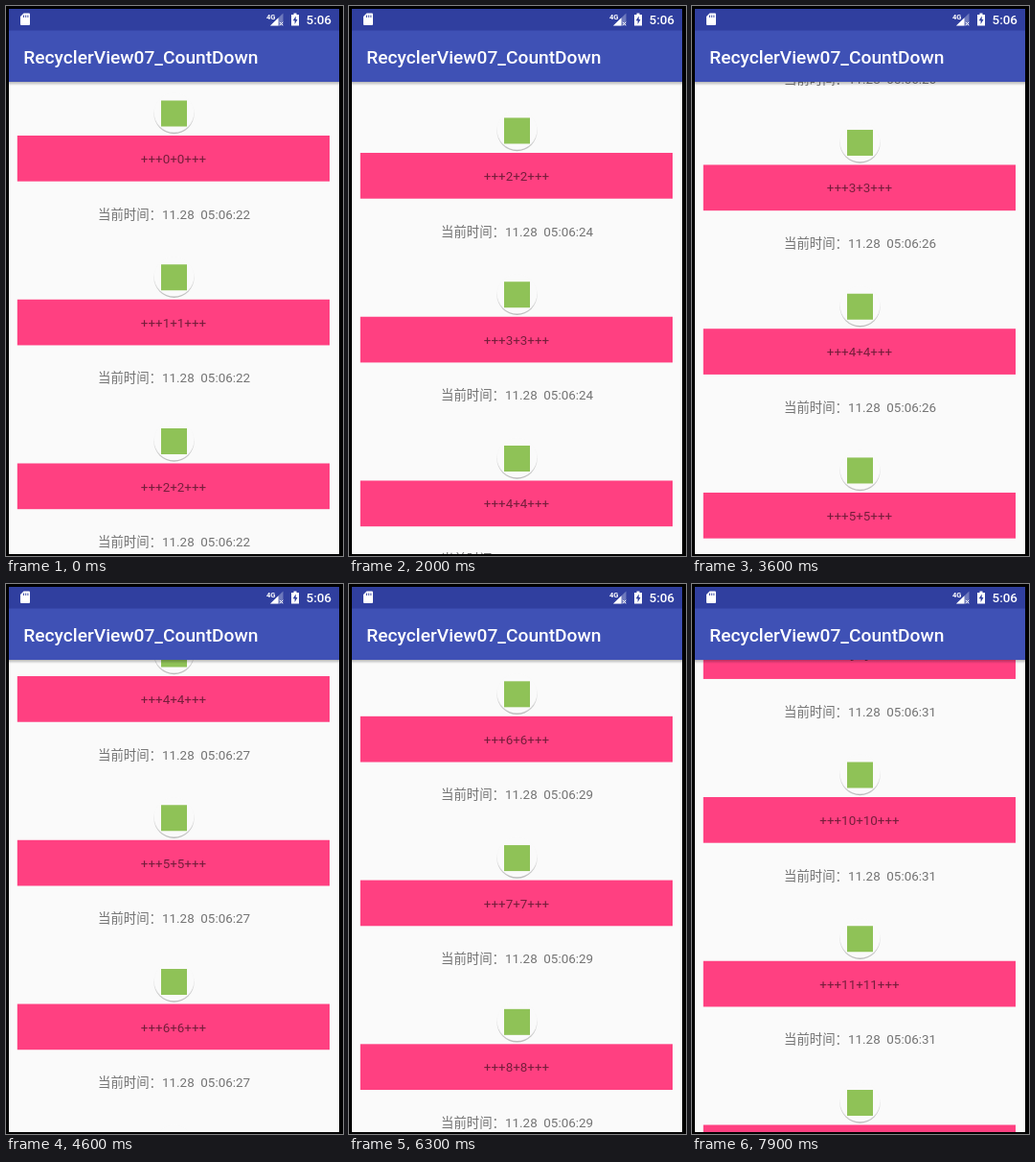
Write an HTML page that moves like this. It is 352 px wide and 573 px high and loops after 8 s.

```html
<!DOCTYPE html>
<html lang="zh-CN">
<head>
<meta charset="utf-8">
<title>CountDown list</title>
<style>
  html, body { margin: 0; width: 100%; height: 100%; overflow: hidden; background: #000; }
  svg { display: block; width: 352px; height: 573px; }
  text { font-family: Roboto, "Noto Sans CJK SC", "Noto Sans CJK", sans-serif; white-space: pre; }
  #list text { font-size: 13.42px; text-anchor: middle; fill: #000; fill-opacity: .54; }
  .bar { fill: #fff; font-weight: 500; }
</style>
</head>
<body>
<svg viewBox="0 0 352 573">
  <defs>
    <linearGradient id="shade" x2="0" y2="1">
      <stop stop-color="#000" stop-opacity=".27"/>
      <stop offset="1" stop-color="#000" stop-opacity="0"/>
    </linearGradient>
    <linearGradient id="rim" x2="0" y2="1">
      <stop offset=".35" stop-color="#000" stop-opacity=".03"/>
      <stop offset="1" stop-color="#000" stop-opacity=".25"/>
    </linearGradient>
    <g id="badge">
      <circle cx="175.5" cy="112" r="21.2" fill="url(#rim)"/>
      <circle cx="175.5" cy="111" r="20.8" fill="#fafafa"/>
      <rect x="162" y="98.5" width="27" height="27" fill="#8fc257"/>
    </g>
  </defs>

  <rect width="352" height="573" fill="#fafafa"/>
  <g id="list"></g>

  <rect y="79" width="352" height="4" fill="url(#shade)"/>
  <rect width="352" height="79" fill="#3f51b5"/>
  <rect width="352" height="25.5" fill="#303f9f"/>
  <text class="bar" x="18.3" y="60" font-size="19.17">RecyclerView07_CountDown</text>

  <g fill="#fff">
    <path d="M18.5 7.5H24q1 0 1 1V19q0 1-1 1H16q-1 0-1-1V11Z"/>
    <path d="M18.5 9.500v2.500M20.700 9.500v2.500M22.900 9.500v2.500" stroke="#303f9f" stroke-width=".9"/>
    <text x="272" y="13.5" font-size="7.5" font-weight="700">4G</text>
    <path d="M276 20.5L289.5 7.5V20.5Z" fill-opacity=".3"/>
    <path d="M276 20.5L284.5 12.3V20.5Z"/>
    <path d="M285.8 16.8l3.4 3.4m0-3.4l-3.4 3.4" stroke="#fff"/>
    <path d="M300.5 7.5h3V9H306V20.500H298V9h2.500Z"/>
    <path d="M302.7 10.5L299.7 15.3H301.6V19L304.5 14H302.7Z" fill="#303f9f"/>
    <text class="bar" x="340" y="19" font-size="13.42" text-anchor="end">5:06</text>
  </g>
  <path fill="#000" fill-rule="evenodd" d="M0 0H352V573H0ZM3 3V571H348V3Z"/>
</svg>

<script>
const LOOP = 8000, STEP = 100;
const ITEM_HEIGHT = 170.75, ITEM_COUNT = 14;
const FIRST_TICK = 400, TICK = 920, FIRST_SECOND = 22;

const swipes = [
  { start: 1100, steps: 3, to: 110 },
  { start: 1600, steps: 7, to: 350 },
  { start: 2500, steps: 4, to: 447.5 },
  { start: 3600, steps: 5, to: 575 },
  { start: 4400, steps: 7, to: 823 },
  { start: 5400, steps: 6, to: 992.5 },
  { start: 6300, steps: 6, to: 1125.5 },
  { start: 7100, steps: 9, to: 1620.5 },
];

const list = document.getElementById("list");
for (let i = 0; i < ITEM_COUNT; i++) {
  list.insertAdjacentHTML("beforeend", `
    <g transform="translate(0 ${i * ITEM_HEIGHT})">
      <use href="#badge"/>
      <rect x="11.8" y="135" width="326.2" height="47.7" fill="#ff4081"/>
      <text x="175" y="164">+++${i}+${i}+++</text>
      <text class="time" x="175.5" y="221.6"></text>
    </g>`);
}
const times = list.querySelectorAll(".time");

// A short pick-up, then a long slow-down.
const ease = u => 1 - (1 - u ** 1.2) ** 2;

function scrollAt(t) {
  let offset = 0;
  for (const { start, steps, to } of swipes) {
    if (t < start) break;
    const progress = Math.min(((t - start) / STEP + 1) / steps, 1);
    offset += (to - offset) * ease(progress);
  }
  return offset;
}

// A tick shows from the step in which it falls.
function secondAt(t) {
  return FIRST_SECOND + 1 + Math.floor((t + STEP - 1 - FIRST_TICK) / TICK);
}

function draw(now) {
  const t = Math.floor((now % LOOP) / STEP) * STEP;
  list.setAttribute("transform", `translate(0 ${-scrollAt(t)})`);
  const label = `当前时间：11.28\u00a0\u00a005:06:${secondAt(t)}`;
  for (const time of times) {
    if (time.textContent !== label) time.textContent = label;
  }
}

const origin = performance.now();
function frame() {
  draw(performance.now() - origin);
  requestAnimationFrame(frame);
}
frame();
</script>
</body>
</html>
```
